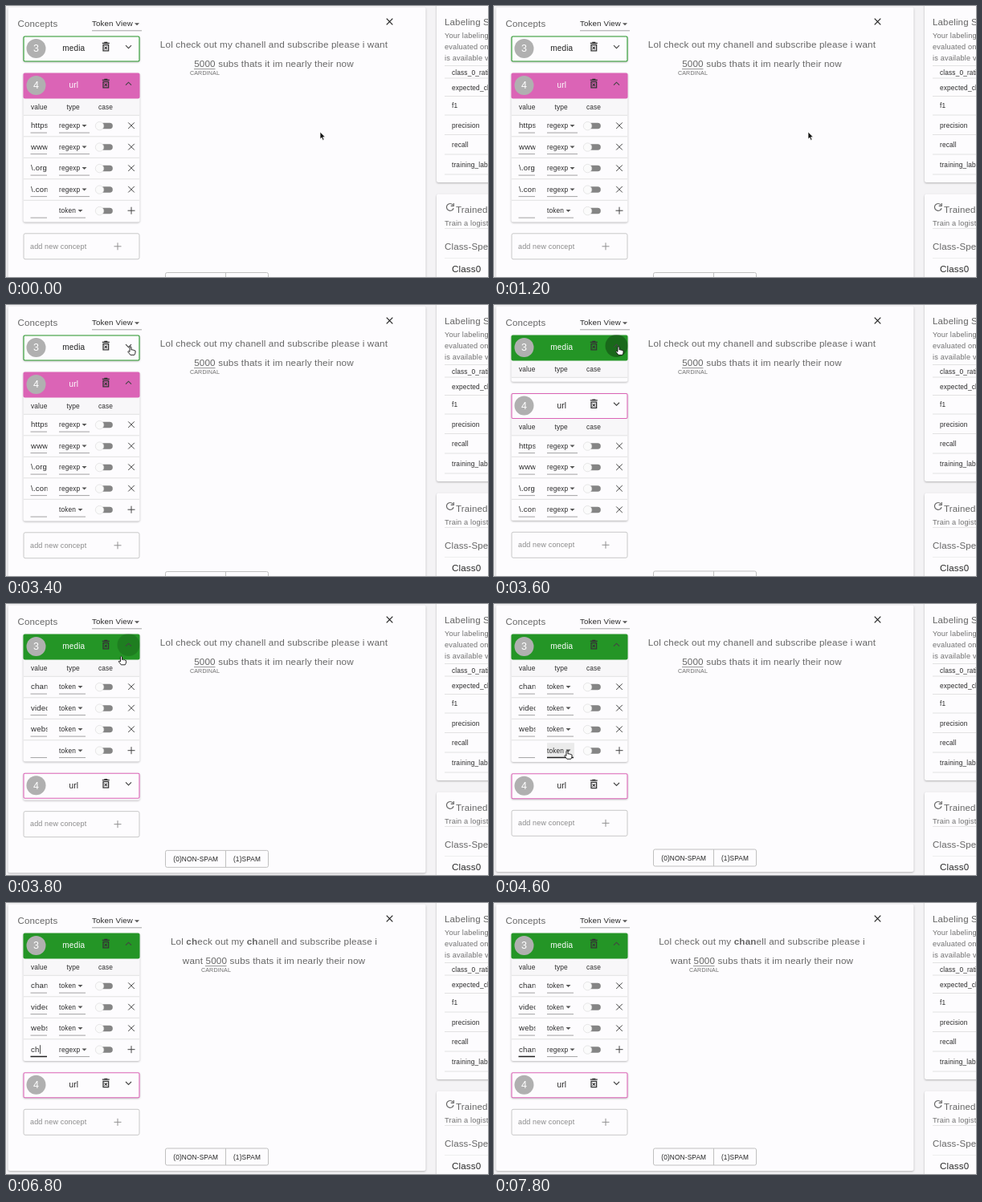
Animation, 600 px wide and 338 px high, one loop 8 s. Source, as an HTML page:

```html
<!DOCTYPE html>
<html lang="en">
<head>
<meta charset="utf-8">
<title>Concept editor</title>
<style>
html, body { margin: 0; height: 100%; overflow: hidden; background: #f4f3f5; }
#stage { display: block; font-family: "Liberation Sans", Arial, sans-serif; letter-spacing: .0094em; }
.card { fill: #fdfcfe; filter: drop-shadow(0 1px 1.3px #0004); }
</style>
</head>
<body>
<svg id="stage" width="600" height="338" viewBox="0 0 600 338"></svg>
<script>
const LOOP = 8000, GREEN = '#249526', PINK = '#db64b6';
const stage = document.getElementById('stage');

const text = (x, y, size, s, fill = '#2a2a2a', anchor = 'start') =>
  `<text x="${x}" y="${y}" font-size="${size}" fill="${fill}" text-anchor="${anchor}">${s}</text>`;
const rect = (x, y, w, h, fill, more = '') =>
  `<rect x="${x}" y="${y}" width="${w}" height="${h}" fill="${fill}" ${more}/>`;
const path = (d, stroke, width = 1, fill = 'none') =>
  `<path d="${d}" stroke="${stroke}" stroke-width="${width}" fill="${fill}"/>`;
const rule = (x, y, w, color = '#e2e2e2', width = 1) => path(`M${x} ${y}h${w}`, color, width);
const card = (x, y, w, h) => rect(x, y, w, h, '', 'rx="2.5" class="card"');
const clip = (x, y, w, h, inner) =>
  `<svg x="${x}" y="${y}" width="${w}" height="${Math.max(h, 0.01)}">${inner}</svg>`;
const cross = (x, y, r, color, width) =>
  path(`M${x - r} ${y - r}l${2 * r} ${2 * r}m0 ${-2 * r}l${-2 * r} ${2 * r}`, color, width);
const plus = (x, y, color) => path(`M${x - 4.5} ${y}h9m-4.5-4.5v9`, color);
const triangle = (x, y) => path(`M${x - 3} ${y - 1.3}h6l-3 3z`, 'none', 0, '#555');

const trash = (x, y) =>
  path(`M${x - 4.5} ${y - 4.5}h9M${x - 2} ${y - 5.4}h4M${x - 3.3} ${y - 2.4}h6.6v7.4h-6.6z`, '#333', 1.3) +
  cross(x, y + 1.4, 1.7, '#333', 1.1);

// One line of a concept table; y is the middle of the line
function row(y, { value = '', type, last, typeFocus, valueFocus, caret }) {
  const w = type === 'token' ? 33 : 38;
  const bar = caret ? rect(1.1 + value.length * 5.3, 2.5, 0.8, 11, '#222') : '';
  return clip(30.5, y - 8, 21, 16, text(0.6, 11.2, 9.6, value) + bar) +
    rule(30.5, y + 8.9, 20.5, valueFocus ? '#222' : '#999', valueFocus ? 1.5 : 0.9) +
    (typeFocus ? rect(66, y - 9.5, w + 1, 18, '#ebebeb') : '') +
    text(66, y + 3, 8.3, type) + triangle(65.5 + w - 6, y) +
    rule(66, y + 8.9, w, typeFocus ? '#222' : '#999', typeFocus ? 1.5 : 0.9) +
    rect(117.5, y - 3.5, 15.3, 7.5, '#858585', 'rx="3.75"') +
    `<circle cx="116.5" cy="${y + 0.4}" r="5.2" fill="#fbfbfb" stroke="#ddd" stroke-width=".7"/>` +
    (last ? plus(156, y, '#444') : cross(156, y, 3.8, '#444'));
}

const fullHeight = rows => 21.8 + 26.5 * rows.length;

function concept(y, h, { id, name, color, open, rows, ripple }) {
  const m = y + 16, ink = open ? '#fff' : '#222';
  let body = rect(22, 0, 144, 21, '#f8f7f9') + text(31, 13.5, 8.3, 'value') +
    text(75.5, 13.5, 8.4, 'type') + text(115, 13.5, 8.3, 'case');
  rows.forEach((r, i) => body += rule(22, 21.3 + 26.5 * i, 144) + row(34.2 + 26.5 * i, r));
  return card(21.5, y + 0.3, 145, 32 + h) + clip(0, y + 32, 600, h, body) +
    rect(22, y + 1, 144, 31, open ? color : '#fdfcfe', `rx="1.5" stroke="${color}" stroke-width="1.1"`) +
    `<circle cx="37.5" cy="${m}" r="12" fill="#b0b0b0"/>` +
    text(37.5, m + 4.3, 12.5, id, '#fff', 'middle') + text(84.3, m + 3.3, 10, name, ink, 'middle') +
    trash(124.3, m - 2.1) + ripple +
    path(open ? `M149 ${m - 0.3}l3.5-3.5l3.5 3.5` : `M149 ${m - 3.8}l3.5 3.5l3.5-3.5`, '#444', 1.1);
}

function sentence(typed) {
  const hit = typed.length > 1;
  const mark = s => hit ? s.replaceAll(typed, `<tspan font-weight="bold">${typed}</tspan>`) : s;
  const x = hit ? 248 : 234;
  return text(333.5, 52.3, 11.7, mark('Lol check out my chanell and subscribe please i' + (hit ? '' : ' want')), '#666', 'middle') +
    text(333.5, 76.3, 11.7, (hit ? 'want ' : '') + '5000 subs thats it im nearly their now', '#666', 'middle') +
    rule(x, 78.6, 26.5, '#888', 0.9) + text(x + 13.5, 86, 7.1, 'CARDINAL', '#707070', 'middle');
}

function sidebar() {
  let s = card(536, -6, 90, 226) + card(536, 234.5, 90, 130) +
    text(546, 24, 11.5, 'Labeling Statistics', '#666');
  ['Your labeling functions', 'evaluated on the', 'is available via'].forEach((line, i) =>
    s += text(546, 40 + 14.2 * i, 9.2, line, '#707070'));
  s += rule(546, 74.5, 60);
  [['class_0_ratio', 82.5, 90], ['expected_class', 102, 112.5], ['f1', 123.7, 136], ['precision', 148.5, 160.5],
   ['recall', 173, 185], ['training_label', 197.7, 210]].forEach(([name, y, line]) =>
    s += text(555, y + 3, 8.3, name) + rule(546, line, 60));
  return s + path('M556.2 248a4.4 4.4 0 1 0 .9 4.2M557.3 246v3.4h-3.6', '#666', 1.2) +
    text(560, 258, 11.5, 'Trained Model', '#666') + text(546, 273.6, 9.2, 'Train a logistic', '#707070') +
    rule(546, 277.5, 60, '#e6e6e6') + text(546, 303.5, 11.5, 'Class-Specific', '#666') +
    rule(546, 314.5, 60, '#eee') + text(555, 331.7, 11.6, 'Class0');
}

// Pointer stops: time, x, y
const STOPS = [[1900, 391, 157], [2400, 267, 106], [3000, 155, 51.5], [3750, 155, 51.5], [4250, 42, 184],
  [4600, 91, 182.5], [5100, 91, 182.5], [5600, 56, 190], [6000, 42, 184]];

function pointer(t) {
  if (t >= 6500) return '';
  let [, x, y] = STOPS[0];
  for (let i = 1; i < STOPS.length; i++) {
    const [t0, x0, y0] = STOPS[i - 1], [t1, x1, y1] = STOPS[i];
    const k = Math.min(1, Math.max(0, (t - t0) / (t1 - t0)));
    if (t > t0) { x = x0 + (x1 - x0) * k; y = y0 + (y1 - y0) * k; }
  }
  const onHeader = y < 69 && x < 166;
  const onType = t > 4200 && x > 66 && x < 104;
  const shape = onHeader || onType
    ? path('M-1 1Q0-.6 1 1V4.5Q2.4 3.6 2.9 4.8Q4.2 4 4.7 5.3Q6.2 4.8 6.1 6.5Q6.2 9 4.8 10.8H-.2Q-1.6 8.8-3.3 6.8Q-2.9 5.2-1 6.8Z', '#111', 0.9, '#fff')
    : path('M0 0V9L2 7.2L3.4 10.4L5 9.7L3.6 6.6H6.3Z', '#fff', 0.7, '#111');
  return `<g transform="translate(${x} ${y})">${shape}</g>`;
}

function ease(t, from) {
  const u = Math.min(1, Math.max(0, (t - from) / 300));
  return u * u * (3 - 2 * u);
}

function draw(t) {
  const swapped = t >= 3513, editing = t >= 6150;
  const typed = 'chan'.slice(0, Math.max(0, Math.min(4, Math.floor((t - 6300) / 200))));

  const media = ['chan', 'video', 'website'].map(value => ({ value, type: 'token' }));
  media.push({
    value: typed, type: t < 5000 ? 'token' : 'regexp', last: true,
    typeFocus: t >= 4500 && !editing, valueFocus: editing, caret: editing && t < 7700
  });
  const url = ['https', 'www', '\\.org', '\\.com'].map(value => ({ value, type: 'regexp' }));
  url.push({ type: 'token', last: true });

  // Opening runs slightly ahead of closing
  const h1 = fullHeight(media) * ease(t, 3513), h2 = fullHeight(url) * (1 - ease(t, 3521));
  const y2 = 83 + h1, addY = y2 + 46 + h2, buttonY = addY + 49.2;
  const r = Math.min(14, 9 + (t - 3500) / 20);
  const fade = t < 3500 || t > 3900 ? 0 : Math.min(1, (3900 - t) / 200) * 0.3;
  const ripple = fade ? `<circle cx="152.5" cy="51" r="${r}" opacity="${fade}"/>` : '';

  return rect(0, 0, 600, 338, '#f4f3f5') + card(2.5, 1.5, 520, buttonY + 26.5) + sidebar() +
    text(14.5, 26.2, 11.5, 'Concepts', '#666') + text(107, 25.3, 9.7, 'Token View') +
    triangle(163, 22.5) + rule(107, 30.8, 62, '#999', 0.9) + cross(477.5, 19.5, 3.8, '#222', 1.2) +
    sentence(typed) +
    concept(37, h1, { id: 3, name: 'media', color: GREEN, open: swapped, rows: media, ripple }) +
    concept(y2, h2, { id: 4, name: 'url', color: PINK, open: !swapped, rows: url, ripple: '' }) +
    rect(22, addY + 0.5, 144, 32, 'none', 'rx="2" stroke="#c8c8c8"') +
    text(30, addY + 19.3, 9, 'add new concept', '#8a8a8a') + plus(139, addY + 16.5, '#909090') +
    rect(198.5, buttonY, 128, 21, 'none', 'rx="2" stroke="#c0c0c0"') + path(`M273.5 ${buttonY}v21`, '#c0c0c0') +
    text(236.2, buttonY + 13.6, 8.3, '(0)NON-SPAM', '#222', 'middle') +
    text(300, buttonY + 13.6, 8.3, '(1)SPAM', '#222', 'middle') +
    pointer(t);
}

const start = performance.now();
function tick() {
  stage.innerHTML = draw((performance.now() - start) % LOOP);
  requestAnimationFrame(tick);
}
tick();
</script>
</body>
</html>
```
